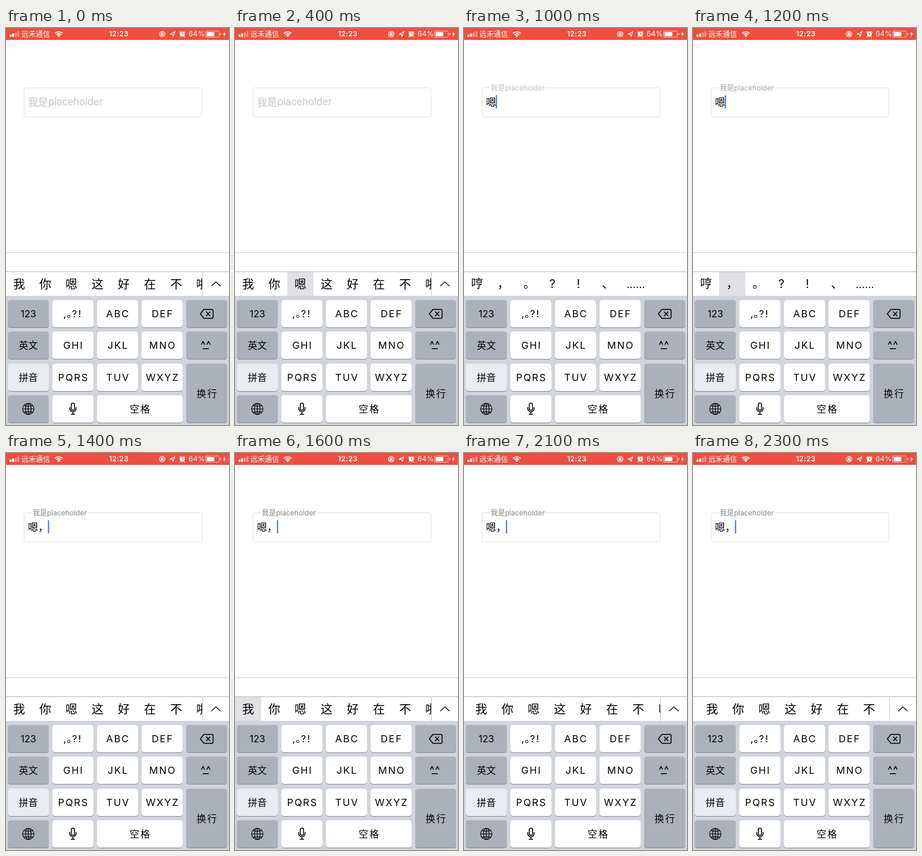
These frames come from a looping animation (375 by 667 pixels, 2400 ms). An HTML page:

```html
<!DOCTYPE html>
<html lang="zh-CN">
<head>
<meta charset="utf-8">
<style>
html, body { margin: 0; width: 100%; height: 100%; overflow: hidden; background: #fff; }
svg { display: block; width: 375px; height: 667px; }
text { font-family: Inter, "Noto Sans CJK SC", "Noto Sans CJK", sans-serif; white-space: pre; }
.mid { text-anchor: middle; }
.line { fill: none; stroke: #000; stroke-width: 1.5; stroke-linecap: round; stroke-linejoin: round; }
.thin { stroke-width: 1.15; }
.white { stroke: #fff; stroke-width: 1.1; }
</style>
</head>
<body>
<svg viewBox="0 0 375 667">
  <defs><clipPath id="strip"><rect y="410" width="330" height="40"/></clipPath></defs>
  <rect width="375" height="667" fill="#fff"/>

  <g id="status" fill="#fff">
    <rect width="375" height="20" fill="#f04e3e"/>
    <rect x="6" y="11" width="3.2" height="4" rx=".6"/>
    <rect x="10.4" y="9.3" width="3.2" height="5.7" rx=".6"/>
    <g opacity=".4">
      <rect x="14.8" y="7.5" width="3.2" height="7.5" rx=".6"/>
      <rect x="19.2" y="5.5" width="3.2" height="9.5" rx=".6"/>
    </g>
    <text x="26" y="14.5" font-size="12">远禾通信</text>
    <g fill="none" stroke="#fff" stroke-width="1.9">
      <path d="M82.3 9a9.2 9.2 0 0 1 12.8 0"/>
      <path d="M84.7 11.4a5.8 5.8 0 0 1 8 0"/>
    </g>
    <path d="M86.4 12.9a3.3 3.3 0 0 1 4.6 0L88.7 15.2z"/>
    <text class="mid" x="189.7" y="14.4" font-size="12" font-weight="600" letter-spacing=".3">12:23</text>
    <path class="line white" d="M266.4 7.6A4.6 4.6 0 1 0 267 11.5M261.2 9.6v-1a1.4 1.4 0 0 1 2.8 0v1"/>
    <path d="M265.3 8.6h3.2l-1.4 2.3z"/>
    <rect x="260.3" y="9.3" width="4.6" height="3.5" rx=".5"/>
    <path class="line white" d="M276 10.6L284.2 6L280.8 14.2L280.2 10.7z"/>
    <circle cx="296.5" cy="10.4" r="4.2"/>
    <path class="line white" d="M291.8 7.6l2-1.8M301.2 7.6l-2-1.8M293.6 14.2l-1 1M299.4 14.2l1 1"/>
    <path d="M296.5 7.8v2.8h2" fill="none" stroke="#f04e3e"/>
    <text x="307" y="14.4" font-size="12" letter-spacing=".1">64%</text>
    <rect x="335.5" y="5" width="23" height="10.5" rx="2" fill="none" stroke="#fff" stroke-opacity=".65"/>
    <rect x="337.3" y="6.8" width="13" height="7"/>
    <path d="M360 8.3a2 2 0 0 1 0 4z" opacity=".7"/>
    <path d="M368.4 5.5l-3.7 5.2h2.3l-1 4.3 4-5.6h-2.4z"/>
  </g>

  <rect x="30.5" y="100.5" width="299" height="49" rx="3" fill="#fff" stroke="#e1e1e1"/>
  <g id="hint" fill="#c7c7cd" font-size="17">
    <text x="37" y="130.5">我是</text>
    <text x="71" y="130" letter-spacing="-.3">placeholder</text>
  </g>
  <rect id="gap" x="44" y="98" width="92.5" height="5" fill="#fff"/>
  <text id="label" x="45" y="104.7" font-size="12" fill="#868686">我是placeholder</text>
  <text id="typed" x="37" y="130.5" font-size="17"></text>
  <rect id="caret" width="2" height="22"/>

  <rect y="377" width="375" height="1" fill="#c9c9c9"/>
  <rect y="409" width="375" height="1" fill="#b4b4b6"/>
  <g clip-path="url(#strip)">
    <rect id="press" y="410" width="44" height="40" fill="#e1e1e5"/>
    <g id="words" class="mid" font-size="20"></g>
    <g id="marks" class="mid" font-size="20"></g>
  </g>
  <g id="more">
    <rect x="330" y="410" width="1" height="40" fill="#c4c4c6"/>
    <path class="line thin" d="M345.5 433.5l7.5-7 7.5 7"/>
  </g>

  <rect y="450" width="375" height="217" fill="#d1d5db"/>
  <g id="keys" class="mid"></g>
  <g id="icons">
    <path class="line" d="M332.8 472.7h12.9a2.6 2.6 0 0 1 2.6 2.6v9.9a2.6 2.6 0 0 1-2.6 2.6h-12.9l-6-7.5zM337 477l6 6.4M343 477l-6 6.4"/>
    <path class="line" stroke-linecap="butt" d="M328.8 531.5l2.5-5 2.5 5M338 531.5l2.5-5 2.5 5M331.5 538.8h9"/>
    <g class="line thin">
      <circle cx="37.5" cy="640" r="9.5"/>
      <ellipse cx="37.5" cy="640" rx="4.8" ry="9.5"/>
      <path d="M37.5 630.5v19M28 640h19M30.3 634.2q7.2 2.4 14.4 0M30.3 645.8q7.2-2.4 14.4 0"/>
    </g>
    <rect class="line" x="109.7" y="630.2" width="5.6" height="12" rx="2.8"/>
    <path class="line" d="M107.2 637.5v2a5.3 5.3 0 0 0 10.6 0v-2M112.5 645v3.8M109.5 649h6"/>
    <g font-size="16.5">
      <text x="96.6" y="486">,</text>
      <text x="102.6" y="486">｡</text>
      <text x="111" y="486">?</text>
      <text x="121.6" y="486">!</text>
    </g>
  </g>
</svg>
<script>
const LOOP = 2400, STEP = 100;
const $ = id => document.getElementById(id);

function add(parent, tag, attrs, text) {
  const el = document.createElementNS(parent.namespaceURI, tag);
  for (const name in attrs) el.setAttribute(name, attrs[name]);
  if (text) el.textContent = text;
  parent.appendChild(el);
  return el;
}

const DARK = '#abb0ba', LIGHT = '#fff', SOFT = '#e9ecf0';

function key(col, row, fill, text, size = 16.5, gap = 0, cols = 1, rows = 1) {
  const x = 3 + 75 * col, y = 457 + 53.3 * row;
  const top = Math.round(y), w = 75 * cols - 6;
  const h = Math.round(53.3 * rows - 7.3);
  const box = { x, width: w, height: h, rx: 4.5 };
  add($('keys'), 'rect', { ...box, y: top + 1, fill: '#888b91' });
  add($('keys'), 'rect', { ...box, y: top, fill });
  if (!text) return;
  const cjk = text.charCodeAt(0) > 255;
  add($('keys'), 'text', {
    x: x + w / 2 + gap / 2,
    y: top + h / 2 + size * (cjk ? 0.38 : 0.364),
    'font-size': size, 'letter-spacing': gap
  }, text);
}

key(0, 0, DARK, '123', 16);
key(0, 1, DARK, '英文', 16);
key(0, 2, SOFT, '拼音', 16);
key(0, 3, DARK);
key(1, 0, LIGHT);
['ABC', 'DEF', 'GHI', 'JKL', 'MNO', 'PQRS', 'TUV', 'WXYZ'].forEach((s, i) =>
  key(1 + (i + 1) % 3, Math.floor((i + 1) / 3), LIGHT, s, 16.5, 1.8));
key(1, 3, LIGHT);
key(2, 3, LIGHT, '空格', 16, 2, 2);
key(4, 0, DARK);
key(4, 1, DARK);
key(4, 2, DARK, '换行', 16, 2, 1, 2);

[...'我你嗯这好在不啦'].forEach((s, i) =>
  add($('words'), 'text', { x: 22 + 44 * i, y: 437.6 }, s));
[['哼', 22], ['，', 66], ['。', 110], ['?', 148.5], ['!', 192.5], ['、', 242]].forEach(([s, x]) =>
  add($('marks'), 'text', { x, y: 437.4 }, s));
add($('marks'), 'text', { x: 289, y: 437, 'font-size': 18 }, '......');

const show = (id, on) => $(id).setAttribute('visibility', on ? 'visible' : 'hidden');
const set = (id, name, value) => $(id).setAttribute(name, value);
const within = (t, from, to) => t >= from && t < to;

function draw(ms) {
  const t = Math.floor((ms % LOOP) / STEP) * STEP;
  const words = t < 600 || t >= 1400;

  show('hint', t < 600);
  show('gap', t >= 700);
  set('label', 'opacity', Math.min(1, Math.max(0, (t - 600) / 800)));
  $('typed').textContent = t < 600 ? '' : t < 1300 ? '嗯' : '嗯，';

  show('caret', t >= 600);
  set('caret', 'x', t < 700 ? 37 : t < 1300 ? 53.5 : 70.5);
  set('caret', 'y', t < 700 ? 110 : 113);
  set('caret', 'fill', t < 1300 ? '#3f6be6' : '#4674bd');

  show('words', words);
  show('more', words);
  show('marks', within(t, 700, 1300));

  const cell = within(t, 400, 600) ? 2 : within(t, 1100, 1300) ? 1 : within(t, 1500, 1900) ? 0 : -1;
  show('press', cell >= 0);
  set('press', 'x', 44 * Math.max(0, cell));

  // the candidate row follows the finger to the right
  const u = Math.max(0, (t - 1800) / 500);
  const slide = 10 * u * (0.79 + 1.25 * u - 1.04 * u * u);
  set('words', 'transform', `translate(${slide.toFixed(2)} 0)`);
}

let start;
function tick(now) {
  if (start === undefined) start = now;
  draw(Math.max(0, now - start));
  requestAnimationFrame(tick);
}
draw(0);
requestAnimationFrame(tick);
</script>
</body>
</html>
```
